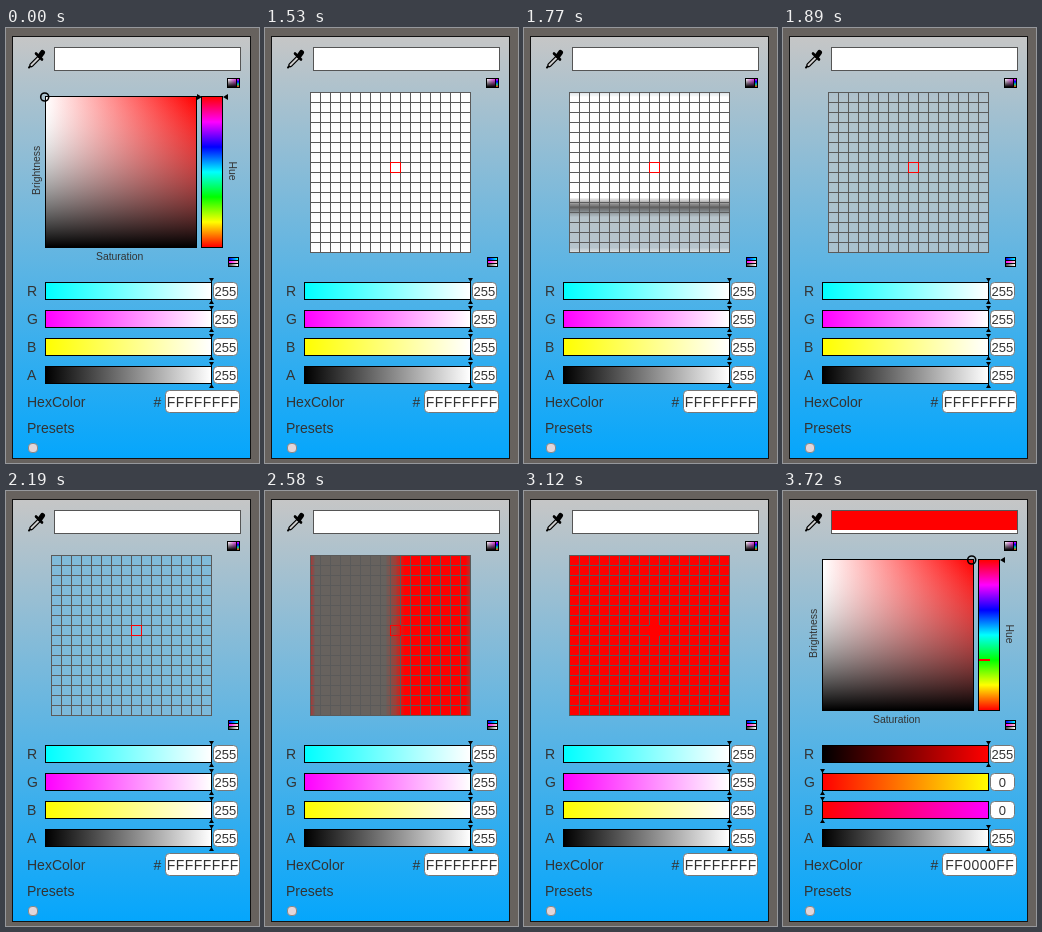
Recreate the animation shown at these times as an HTML page with a canvas. Size 253 px wide and 435 px high, loop 6090 ms.

```html
<!DOCTYPE html>
<html lang="en">
<head>
<meta charset="utf-8">
<title>Colour picker</title>
<style>
html, body { margin: 0; width: 100%; height: 100%; overflow: hidden; background: #67625e; }
canvas { display: block; }
</style>
</head>
<body>
<canvas id="stage" width="253" height="435"></canvas>
<script>
const LOOP = 6090, PICK = 1530, DONE = 3720, STEP = 30;
const FONT = '"Liberation Sans", Arial, sans-serif';
const ctx = document.getElementById('stage').getContext('2d');

// Magnifier texture: 16 x 16 samples plus a wrapped rim.
const lens = document.createElement('canvas');
lens.width = lens.height = 18;
const lensCtx = lens.getContext('2d');

// Cursor path while picking: time, x, y
const PATH = [
  [1530, 150, 33], [1560, 152, 34], [1770, 170, 38], [1860, 185, 46],
  [2040, 212, 150], [2160, 212, 150], [2190, 228, 165], [2400, 255, 165],
  [2550, 255, 165], [2580, 256, 165], [2610, 256, 165], [2640, 257, 165],
  [2670, 259, 165], [2940, 259, 165], [2970, 261, 165], [3120, 266, 165]
];

const TOP = [198, 198, 198], BOTTOM = [5, 166, 252];
const rgb = c => `rgb(${c.map(Math.round)})`;
const mix = (a, b, k) => a.map((v, i) => v + (b[i] - v) * k);

function rect(x, y, w, h, fill) {
  ctx.fillStyle = fill;
  ctx.fillRect(x, y, w, h);
}

function framed(x, y, w, h, fill, border = '#000') {
  rect(x, y, w, h, border);
  rect(x + 1, y + 1, w - 2, h - 2, fill);
}

function ramp(x0, y0, x1, y1, ...colors) {
  const g = ctx.createLinearGradient(x0, y0, x1, y1);
  colors.forEach((c, i) => g.addColorStop(i / (colors.length - 1), c));
  return g;
}

function text(s, x, y, { size = 14, angle = 0, spacing = 0, align = 'left' } = {}) {
  ctx.save();
  ctx.translate(x, y);
  ctx.rotate(angle);
  ctx.font = `${size}px ${FONT}`;
  ctx.letterSpacing = spacing + 'px';
  ctx.textAlign = align;
  ctx.fillStyle = '#333';
  ctx.fillText(s, 0, 0);
  ctx.restore();
}

function poly(fill, ...points) {
  ctx.fillStyle = fill;
  ctx.beginPath();
  points.forEach(p => ctx.lineTo(...p));
  ctx.closePath();
  ctx.fill();
}

function line(color, width, x0, y0, x1, y1) {
  ctx.strokeStyle = color;
  ctx.lineWidth = width;
  ctx.beginPath();
  ctx.moveTo(x0, y0);
  ctx.lineTo(x1, y1);
  ctx.stroke();
}

function rounded(x, y, w, h, r, fill, border) {
  ctx.beginPath();
  ctx.roundRect(x + .5, y + .5, w - 1, h - 1, r);
  ctx.fillStyle = fill;
  ctx.fill();
  ctx.strokeStyle = border;
  ctx.lineWidth = 1;
  ctx.stroke();
}

function dropper() {
  ctx.lineCap = 'round';
  line('#000', 4.5, 25.5, 37, 32.5, 30);
  line('#000', 2, 23, 39.5, 25.5, 37);
  line('#ccc', 2, 25.5, 37, 32.5, 30);
  line('#000', 2.6, 30, 25.5, 36, 31.5);
  line('#000', 5, 34, 28, 36.5, 24.5);
  ctx.lineCap = 'butt';
}

function icons() {
  framed(221, 50, 13, 10, ramp(222, 0, 230, 0, '#fff', '#e040e0'));
  rect(222, 51, 8, 8, ramp(0, 51, 0, 59, 'rgba(0,0,0,0)', '#000'));
  rect(230, 50, 1, 10, '#000');
  rect(231, 51, 2, 8, ramp(0, 51, 0, 59, '#f0f', '#00f', '#0c8', '#f40'));
  rect(222, 229, 11, 10, '#000');
  [['#00f', '#0ff'], ['#f0f', '#fcc'], ['#444', '#fff']].forEach((c, i) =>
    rect(223, 230 + 3 * i, 9, 2, ramp(223, 0, 232, 0, ...c)));
}

function slider(label, y, colors, value) {
  const x = value ? 205 : 39;
  text(label, 21, y + 14);
  framed(39, y, 167, 18, ramp(40, 0, 205, 0, ...colors));
  rect(x, y - 4, 1, 26, '#000');
  poly('#000', [x - 2, y - 4], [x + 3, y - 4], [x + .5, y]);
  poly('#000', [x - 2, y + 22], [x + 3, y + 22], [x + .5, y + 18]);
  rounded(207, y, 25, 18, 4, '#fff', '#777');
  text(value, 219.3, y + 14, { size: 13, align: 'center' });
}

function panel(picked) {
  rect(0, 0, 253, 435, '#67625e');
  framed(6, 8, 239, 423, ramp(0, 8, 0, 430, rgb(TOP), rgb(BOTTOM)), '#111');
  dropper();
  framed(48, 19, 187, 24, '#fff', '#555');
  if (picked) rect(49, 20, 185, 19, '#f00');
  icons();

  const bars = picked
    ? [['#000', '#f00'], ['#f00', '#ff0'], ['#f00', '#f0f'], ['#000', '#fff']]
    : [['#0ff', '#fff'], ['#f0f', '#fff'], ['#ff0', '#fff'], ['#000', '#fff']];
  bars.forEach((c, i) =>
    slider('RGBA'[i], 254 + 28 * i, c, picked && (i === 1 || i === 2) ? 0 : 255));

  text('HexColor', 21, 379);
  text('#', 147.5, 379);
  rounded(159, 362, 75, 23, 4, '#fff', '#777');
  text(picked ? 'FF0000FF' : 'FFFFFFFF', 196.8, 379, { spacing: .45, align: 'center' });
  text('Presets', 21, 405);
  rounded(22, 415, 10, 10, 3.5, '#e2d6da', '#888');
}

function spectrum(picked) {
  framed(39, 68, 152, 152, ramp(40, 0, 190, 0, '#fff', '#f00'));
  // The shade runs from clear white to black, so its middle is a grey haze.
  rect(40, 69, 150, 150, ramp(0, 69, 0, 219, 'rgba(255,255,255,0)', 'rgba(0,0,0,1)'));
  framed(195, 68, 22, 152,
    ramp(0, 69, 0, 219, '#f00', '#f0f', '#00f', '#0ff', '#0f0', '#ff0', '#f00'));
  if (picked) rect(196, 168, 11, 2, '#f00');
  else poly('#000', [191, 66], [191, 72], [196, 69]);
  poly('#000', [222, 66], [222, 72], [217, 69]);
  ctx.strokeStyle = '#000';
  ctx.lineWidth = 1.6;
  ctx.beginPath();
  ctx.arc(picked ? 188.7 : 38.7, 69, 4, 0, 2 * Math.PI);
  ctx.stroke();
  text('Brightness', 34, 167, { size: 10.4, angle: -Math.PI / 2 });
  text('Saturation', 90, 231.5, { size: 10.4 });
  text('Hue', 222.5, 133.5, { size: 10.4, angle: Math.PI / 2 });
}

// Colour of the screen under the magnifier
function screenColor(x, y) {
  if (x > 256) return '#f00';
  if (x === 256) return '#a04038';
  if (x > 244) return '#67625e';
  if (x === 244) return '#111';
  if (y < 42) return '#fff';
  if (y === 42) return '#606060';
  return rgb(mix(TOP, BOTTOM, (y - 8) / 422));
}

function cursorAt(time) {
  const t = PICK + Math.floor((time - PICK) / STEP) * STEP;
  const next = PATH.findIndex(p => p[0] > t);
  if (next < 0) return PATH[PATH.length - 1].slice(1);
  const a = PATH[next - 1], b = PATH[next];
  return mix(a, b, (t - a[0]) / (b[0] - a[0])).slice(1).map(Math.round);
}

function magnifier(time) {
  const [cx, cy] = cursorAt(time);
  for (let j = 0; j < 18; j++) {
    for (let i = 0; i < 18; i++) {
      lensCtx.fillStyle = screenColor(cx - 8 + (i + 15) % 16, cy - 7 + (j + 15) % 16);
      lensCtx.fillRect(i, j, 1, 1);
    }
  }
  ctx.save();
  ctx.beginPath();
  ctx.rect(45, 64, 160, 160);
  ctx.clip();
  ctx.drawImage(lens, 35, 54, 180, 180);
  ctx.restore();
  for (let i = 0; i <= 16; i++) {
    rect(45 + 10 * i, 64, 1, 161, '#5a5a5a');
    rect(45, 64 + 10 * i, 161, 1, '#5a5a5a');
  }
  for (const d of [0, 10]) {
    rect(125 + d, 134, 1, 11, '#f00');
    rect(125, 134 + d, 11, 1, '#f00');
  }
}

const start = performance.now();

function draw() {
  const time = (performance.now() - start) % LOOP;
  const picked = time >= DONE;
  panel(picked);
  if (time >= PICK && !picked) magnifier(time);
  else spectrum(picked);
  requestAnimationFrame(draw);
}
draw();
</script>
</body>
</html>
```
